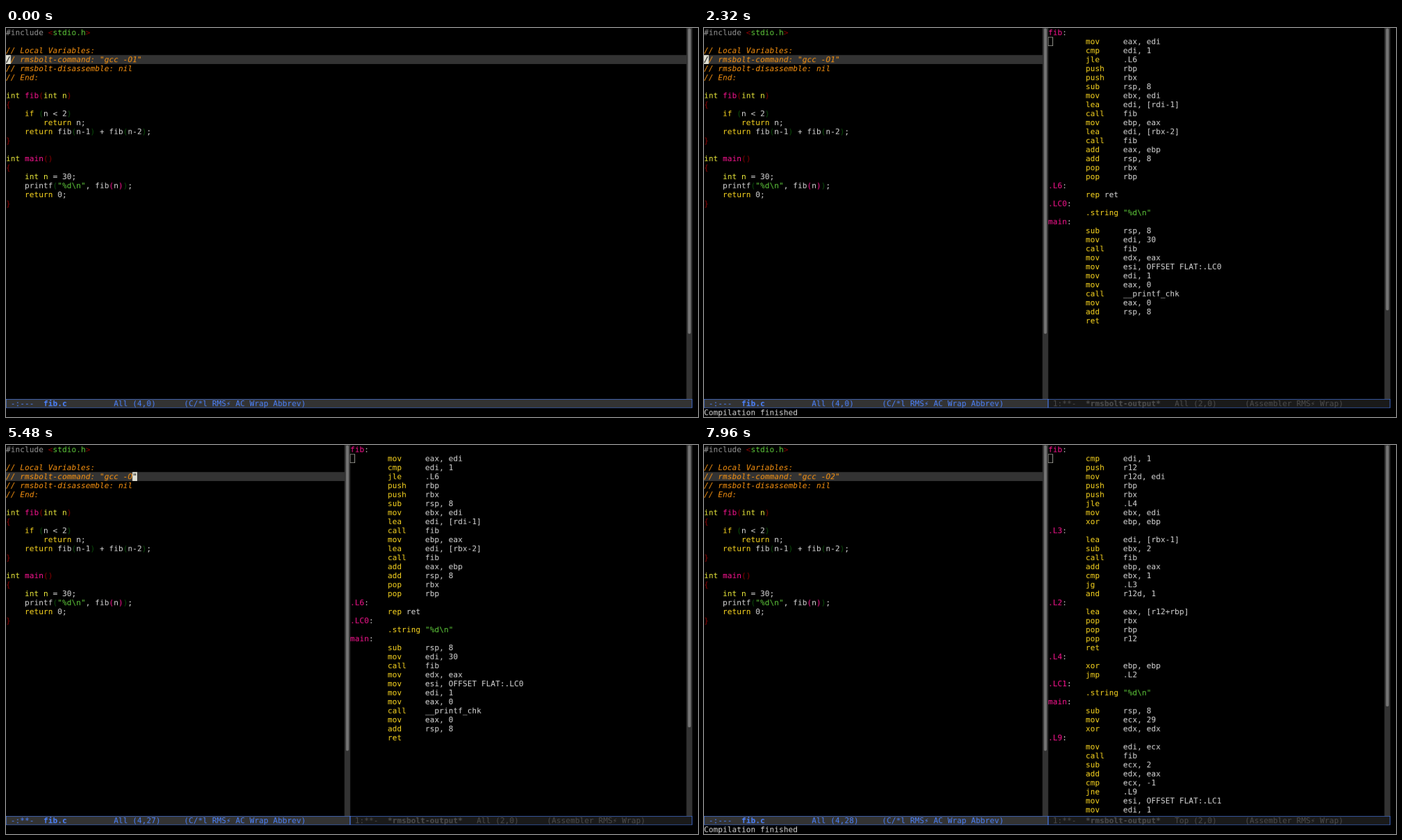
Animation, 997 px wide and 561 px high, one loop 8000 ms. Source, as an HTML page with a canvas:

```html
<!DOCTYPE html>
<html lang="en">
<head>
<meta charset="utf-8">
<title>Compiling fib.c in an editor</title>
<style>
  html, body { margin: 0; width: 100%; height: 100%; overflow: hidden; background: #000; }
  canvas { display: block; }
</style>
</head>
<body>
<canvas id="screen" width="997" height="561"></canvas>
<script>
// The editor is drawn on a 1920 x 1080 desktop and scaled down to the stage.
const screenCtx = document.getElementById('screen').getContext('2d');
const desktop = document.createElement('canvas');
desktop.width = 1920;
desktop.height = 1080;
const ctx = desktop.getContext('2d');

const CELL = 13, ROW = 25, ASCENT = 20, FONT_SIZE = 21.33;
const LOOP = 8000, BLINK = 500;
const FULL_WIDTH = 1904, SPLIT_X = 955, BAR_WIDTH = 16, MODE_BOTTOM = 1055;

// "@x" in a text switches to colour x.
const COLORS = {
  n: '#dcdcdc', g: '#999999', s: '#61ce3c', c: '#ff9610', t: '#f0ee3c',
  k: '#ffda20', f: '#ff1493', r: '#8b0000', d: '#0a500a', b: '#4c83ff',
  i: '#4d4d4d', x: '#000000'
};
const CURSOR = '#e0e0d4', SHADE = '#333333', THUMB = '#757575';

const source = command => String.raw`@g#include @r<@sstdio.h@r>

@c// Local Variables:
@c${command}
@c// rmsbolt-disassemble: nil
@c// End:

@tint @ffib@r(@tint n@r)
@r{
    @kif @d(@nn < 2@d)
        @kreturn @nn;
    @kreturn @nfib@d(@nn-1@d)@n + fib@d(@nn-2@d)@n;
@r}

@tint @fmain@r()
@r{
    @tint n @n= 30;
    printf@d(@s"%d\n"@n, fib@f(@nn@f)@d)@n;
    @kreturn @n0;
@r}`.split('\n');

const listing = text => text.split('\n').map(line => {
  if (line.endsWith(':')) return `@f${line.slice(0, -1)}@n:`;
  const [, op, args] = line.match(/^(\S+) ?(.*)$/);
  const color = args.startsWith('"') ? '@s' : '@n';
  return ' '.repeat(8) + '@k' + op.padEnd(op === 'rep' ? 4 : 8) + color + args;
});

const ASM_O1 = listing(String.raw`fib:
mov eax, edi
cmp edi, 1
jle .L6
push rbp
push rbx
sub rsp, 8
mov ebx, edi
lea edi, [rdi-1]
call fib
mov ebp, eax
lea edi, [rbx-2]
call fib
add eax, ebp
add rsp, 8
pop rbx
pop rbp
.L6:
rep ret
.LC0:
.string "%d\n"
main:
sub rsp, 8
mov edi, 30
call fib
mov edx, eax
mov esi, OFFSET FLAT:.LC0
mov edi, 1
mov eax, 0
call __printf_chk
mov eax, 0
add rsp, 8
ret`);

const ASM_O2 = listing(String.raw`fib:
cmp edi, 1
push r12
mov r12d, edi
push rbp
push rbx
jle .L4
mov ebx, edi
xor ebp, ebp
.L3:
lea edi, [rbx-1]
sub ebx, 2
call fib
add ebp, eax
cmp ebx, 1
jg .L3
and r12d, 1
.L2:
lea eax, [r12+rbp]
pop rbx
pop rbp
pop r12
ret
.L4:
xor ebp, ebp
jmp .L2
.LC1:
.string "%d\n"
main:
sub rsp, 8
mov ecx, 29
xor edx, edx
.L9:
mov edi, ecx
call fib
sub ecx, 2
add edx, eax
cmp ecx, -1
jne .L9
mov esi, OFFSET FLAT:.LC1
mov edi, 1`);

const COMPLETIONS = [
  '@sM-x @n{@frmsbolt-compile@n | rmsbolt-mode | byte-compile-file | set-default-font' +
    ' | describe-fontset | list-fontsets | package-list-packages |',
  'comment-or-uncomment-region | org-nikola-export-as-rst | tiny-expand | ...}'
];

// Each step changes part of the editor state; key presses restart the cursor blink.
const STEPS = [
  { at: 0, key: true, level: '1', column: 0, prompt: false, asm: null, message: '', modified: false },
  { at: 1280, key: true, prompt: true },
  { at: 1920, key: true, prompt: false },
  { at: 2040, asm: ASM_O1, message: 'Compilation finished' },
  { at: 3760, key: true, message: '' },
  { at: 4600, key: true, column: 29 },
  { at: 4860, key: true, column: 28 },
  { at: 5240, key: true, column: 27, level: '', modified: true },
  { at: 5760, key: true, column: 28, level: '2' },
  { at: 6080, key: true, modified: false },
  { at: 6400, key: true },
  { at: 6480, asm: ASM_O2, message: 'Compilation finished' }
];

function stateAt(time) {
  const passed = STEPS.filter(step => step.at <= time);
  const lastKey = passed.filter(step => step.key).pop().at;
  const cursorOn = Math.floor((time - lastKey) / BLINK) % 2 === 0;
  return Object.assign({ cursorOn }, ...passed);
}

function rect(x, y, width, height, color) {
  ctx.fillStyle = color;
  ctx.fillRect(x, y, width, height);
}

function outline(x, y, width, height, color) {
  ctx.strokeStyle = color;
  ctx.lineWidth = 1;
  ctx.strokeRect(x + 0.5, y + 0.5, width - 1, height - 1);
}

function write(x, y, text, color = 'n', style = '') {
  let column = 0;
  for (const part of text.match(/@?[^@]+/g) || []) {
    let run = part;
    if (part[0] === '@') {
      color = part[1];
      run = part.slice(2);
    }
    ctx.fillStyle = COLORS[color];
    ctx.font = `${color === 'c' ? 'italic' : style} ${FONT_SIZE}px "DejaVu Sans Mono", "DejaVu Sans", monospace`;
    for (const char of run) {
      const glyph = char === '⚡' ? char + '\uFE0E' : char;
      if (char !== ' ') ctx.fillText(glyph, x + column * CELL, y + ASCENT);
      column++;
    }
  }
}

function blockCursor(x, y, char, style) {
  rect(x, y, CELL, ROW, CURSOR);
  write(x, y, char, 'x', style);
}

function scrollBar(right, top, bottom, thumbBottom) {
  const x = right - BAR_WIDTH;
  rect(x, top, BAR_WIDTH, bottom - top, SHADE);
  ctx.fillStyle = THUMB;
  ctx.beginPath();
  ctx.roundRect(x + 4, top + 1, 8, thumbBottom - top - 1, 4);
  ctx.fill();
}

function modeLine(left, right, bottom, active, { status, name, position, positionColumn, modes, modesColumn }) {
  const y = bottom - ROW, color = active ? 'b' : 'i';
  rect(left, y, right - left, ROW, active ? SHADE : '#1a1a1a');
  const put = (column, text, style) => write(left + column * CELL, y, text, color, style);
  put(1, status);
  put(8, name, 'bold');
  put(positionColumn, position);
  put(modesColumn, modes);
  outline(left, y, right - left, ROW, COLORS.b);
}

function sourcePane(state) {
  const right = state.asm ? SPLIT_X : FULL_WIDTH;
  const bottom = MODE_BOTTOM - (state.prompt ? ROW : 0);
  const command = `// rmsbolt-command: "gcc -O${state.level}"`;
  const x = state.column * CELL, y = 3 * ROW;

  rect(0, y, right - BAR_WIDTH, ROW, SHADE);
  source(command).forEach((line, row) => write(0, row * ROW, line));
  if (state.prompt) outline(x, y, CELL, ROW, CURSOR);
  else if (state.cursorOn) blockCursor(x, y, command[state.column] || ' ', 'italic');

  scrollBar(right, 0, bottom - ROW, state.prompt ? 824 : 849);
  modeLine(0, right, bottom, true, {
    status: state.modified ? '-:**-' : '-:---',
    name: 'fib.c',
    position: `All (4,${state.column})`, positionColumn: 23,
    modes: '(C/*l RMS⚡ AC Wrap Abbrev)', modesColumn: 38
  });
}

function outputPane(asm) {
  const long = asm === ASM_O2;
  asm.forEach((line, row) => write(SPLIT_X, row * ROW, line));
  outline(SPLIT_X, ROW, CELL, ROW, CURSOR);
  scrollBar(FULL_WIDTH, 0, MODE_BOTTOM - ROW, long ? 726 : 784);
  modeLine(SPLIT_X, FULL_WIDTH, MODE_BOTTOM, false, {
    status: '1:**-',
    name: '*rmsbolt-output*',
    position: `${long ? 'Top' : 'All'} (2,0)`, positionColumn: 27,
    modes: '(Assembler RMS⚡ Wrap)', modesColumn: 42
  });
}

function promptArea(cursorOn) {
  const top = MODE_BOTTOM - ROW;
  COMPLETIONS.forEach((line, row) => write(0, top + row * ROW, line));
  if (cursorOn) blockCursor(4 * CELL, top, '{');
  scrollBar(FULL_WIDTH, top, desktop.height, 1060);
}

function draw(now) {
  const state = stateAt(now % LOOP);
  rect(0, 0, desktop.width, desktop.height, '#000');
  sourcePane(state);
  if (state.asm) outputPane(state.asm);
  if (state.prompt) promptArea(state.cursorOn);
  else write(0, MODE_BOTTOM, state.message);

  screenCtx.imageSmoothingQuality = 'high';
  screenCtx.drawImage(desktop, 0, 0, 997, 561);
}

const start = performance.now();
function tick() {
  draw(performance.now() - start);
  requestAnimationFrame(tick);
}
tick();
</script>
</body>
</html>
```
